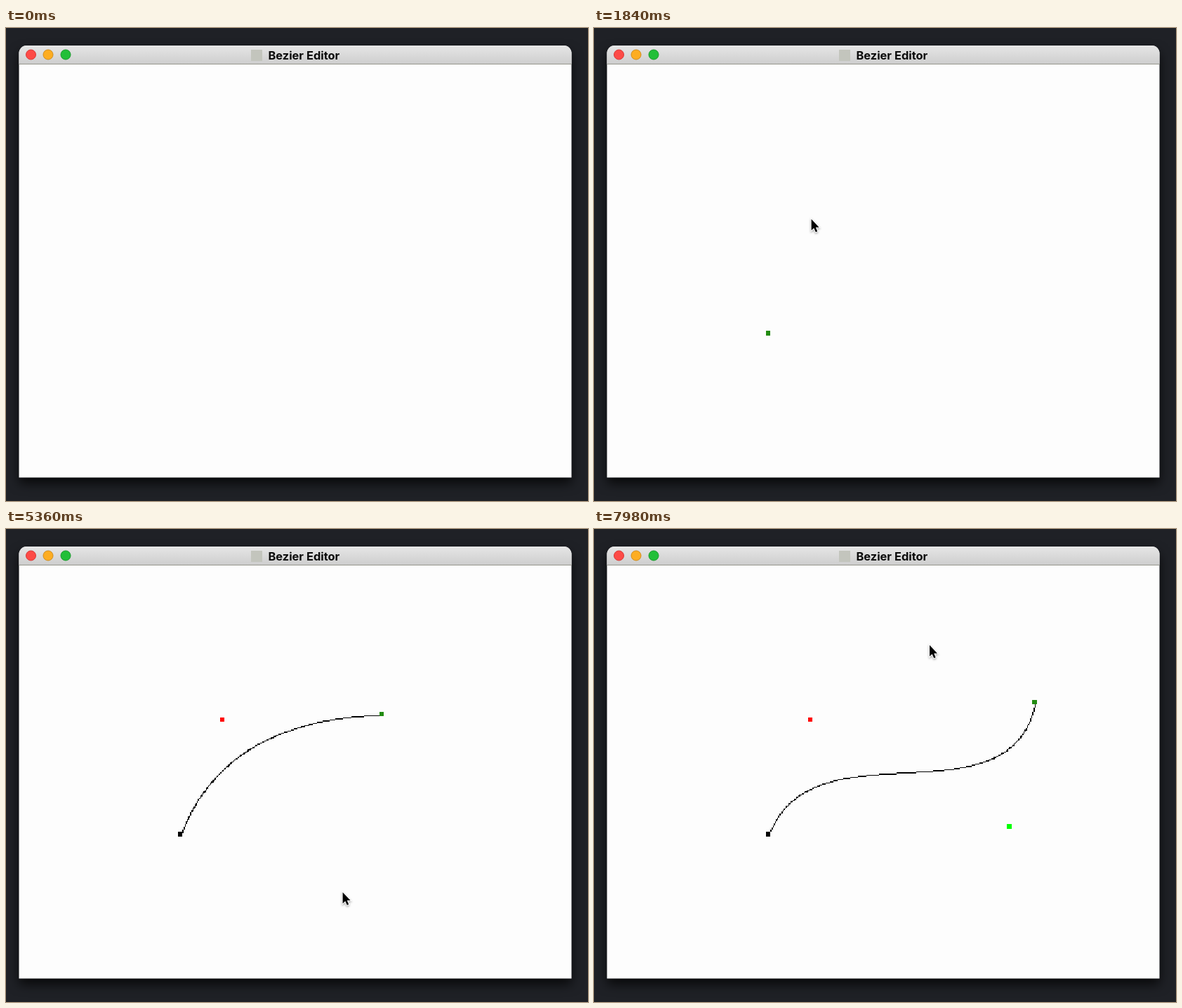
Recreate the animation shown at these times as an HTML page with a canvas. Size 829 by 675 pixels, loop 8000 ms.

```html
<!DOCTYPE html>
<html lang="en">
<head>
<meta charset="utf-8">
<title>Bezier Editor</title>
<style>
  html, body { margin: 0; width: 100%; height: 100%; overflow: hidden; background: #1f2126; }
  svg, canvas { position: absolute; left: 0; top: 0; }
  .window { fill: #fdfdfd; filter: drop-shadow(0 8px 8px rgba(0, 0, 0, .75)); }
  text { font: 700 16.4px Inter, "Liberation Sans", sans-serif; fill: #0c0c0c; }
</style>
</head>
<body>
<svg width="829" height="675">
  <linearGradient id="bar" x2="0" y2="1">
    <stop stop-color="#e6e6e6"/>
    <stop offset="1" stop-color="#cecece"/>
  </linearGradient>
  <path class="window" d="M18.5 641.5V36a11 11 0 0 1 11-11H794.5a11 11 0 0 1 11 11V641.5Z"/>
  <path fill="url(#bar)" d="M18.5 51V36a11 11 0 0 1 11-11H794.5a11 11 0 0 1 11 11V51Z"/>
  <path stroke="#96968c" d="M18.5 51.5H805.5"/>
  <circle cx="35.5" cy="38" r="7" fill="#fd4b47" stroke="#d93a38"/>
  <circle cx="60" cy="38" r="7" fill="#fdad22" stroke="#d08c1c"/>
  <circle cx="85" cy="38" r="7" fill="#22bf38" stroke="#179a2a"/>
  <rect x="349" y="31" width="16" height="16" fill="#c3c5bd"/>
  <text x="373.5" y="44.5">Bezier Editor</text>
</svg>
<canvas width="829" height="675"></canvas>
<script>
const ctx = document.querySelector('canvas').getContext('2d');
const LOOP = 8000, SCALE = 1.574;

// Positions are in units of the 500 x 375 editing surface
const sx = x => Math.round(18.5 + x * SCALE);
const sy = y => Math.round(51.5 + y * SCALE);
const mix = (a, b, k) => a + (b - a) * k;
const mixPoint = (a, b, k) => [mix(a[0], b[0], k), mix(a[1], b[1], k)];

// Cursor moves: when it leaves, when it arrives, and where
const entry = [355, 398];
const moves = [
  [20, 850, [146, 244]],
  [1240, 1840, [184, 140]],
  [2020, 2640, [329, 137]],
  [2640, 2760, [328, 135]],
  [2840, 3080, [403, 268]],
  [3340, 3740, [283, 304]],
  [4000, 4280, [292, 296]],
  [6480, 6680, [364, 237]],
  [6980, 7280, [387, 124]],
  [7560, 7980, [291, 72]]
];

// A click adds a point under the cursor, an undo removes the last one
const clicks = [1080, 2020, 2840, 3340, 4000, 6760, 7560];
const undos = [4740, 5360, 5900];
const edits = [...clicks, ...undos].sort((a, b) => a - b);

function cursorAt(t) {
  let at = entry;
  for (const [leave, arrive, goal] of moves) {
    if (t <= leave) break;
    const k = Math.min(1, (t - leave) / (arrive - leave));
    at = mixPoint(at, goal, k * k * (3 - 2 * k));
  }
  return at;
}

function pointsAt(t) {
  const list = [];
  for (const time of edits.filter(e => e <= t)) {
    if (undos.includes(time)) list.pop();
    else list.push(cursorAt(time));
  }
  return list;
}

function dot(x, y, size) {
  ctx.fillRect(sx(x), sy(y), sx(x + size) - sx(x), sy(y + size) - sy(y));
}

function line(a, b) {
  const n = Math.max(Math.abs(b[0] - a[0]), Math.abs(b[1] - a[1])) || 1;
  for (let i = 0; i <= n; i++) {
    const [x, y] = mixPoint(a, b, i / n);
    dot(Math.round(x), Math.round(y), 1);
  }
}

function bezier(p, k) {
  while (p.length > 1) p = p.slice(1).map((b, i) => mixPoint(p[i], b, k));
  return p[0];
}

function curve(p) {
  const steps = p.length > 2 ? 300 : p.length - 1;
  let last = p[0];
  for (let i = 1; i <= steps; i++) {
    const next = bezier(p, i / steps).map(Math.ceil);
    line(last, next);
    last = next;
  }
}

function drawPath(points) {
  ctx.fillStyle = '#000';
  for (let i = 0; i < points.length; i += 3) curve(points.slice(i, i + 4));
  points.forEach(([x, y], i) => {
    const isLast = i === points.length - 1;
    ctx.fillStyle = isLast ? '#228b10' : ['#000', '#f00', '#0f0'][i % 3];
    dot(x - 2, y - 2, 4);
  });
}

const arrow = new Path2D('M0 0V16L3.6 12.6L6.2 18.3L8.6 17.3L6.2 11.6H11Z');

function drawCursor([x, y]) {
  ctx.save();
  ctx.translate(20 + x * SCALE, 52.5 + y * SCALE);
  ctx.shadowColor = 'rgba(0,0,0,.35)';
  ctx.shadowBlur = 3;
  ctx.shadowOffsetY = 1.5;
  ctx.strokeStyle = '#fff';
  ctx.lineWidth = 2;
  ctx.stroke(arrow);
  ctx.shadowColor = 'transparent';
  ctx.fill(arrow);
  ctx.restore();
}

function draw(now) {
  const t = now % LOOP;
  ctx.clearRect(0, 0, 829, 675);
  drawPath(pointsAt(t));
  ctx.fillStyle = '#000';
  drawCursor(cursorAt(t));
  requestAnimationFrame(draw);
}
draw(0);
</script>
</body>
</html>
```
